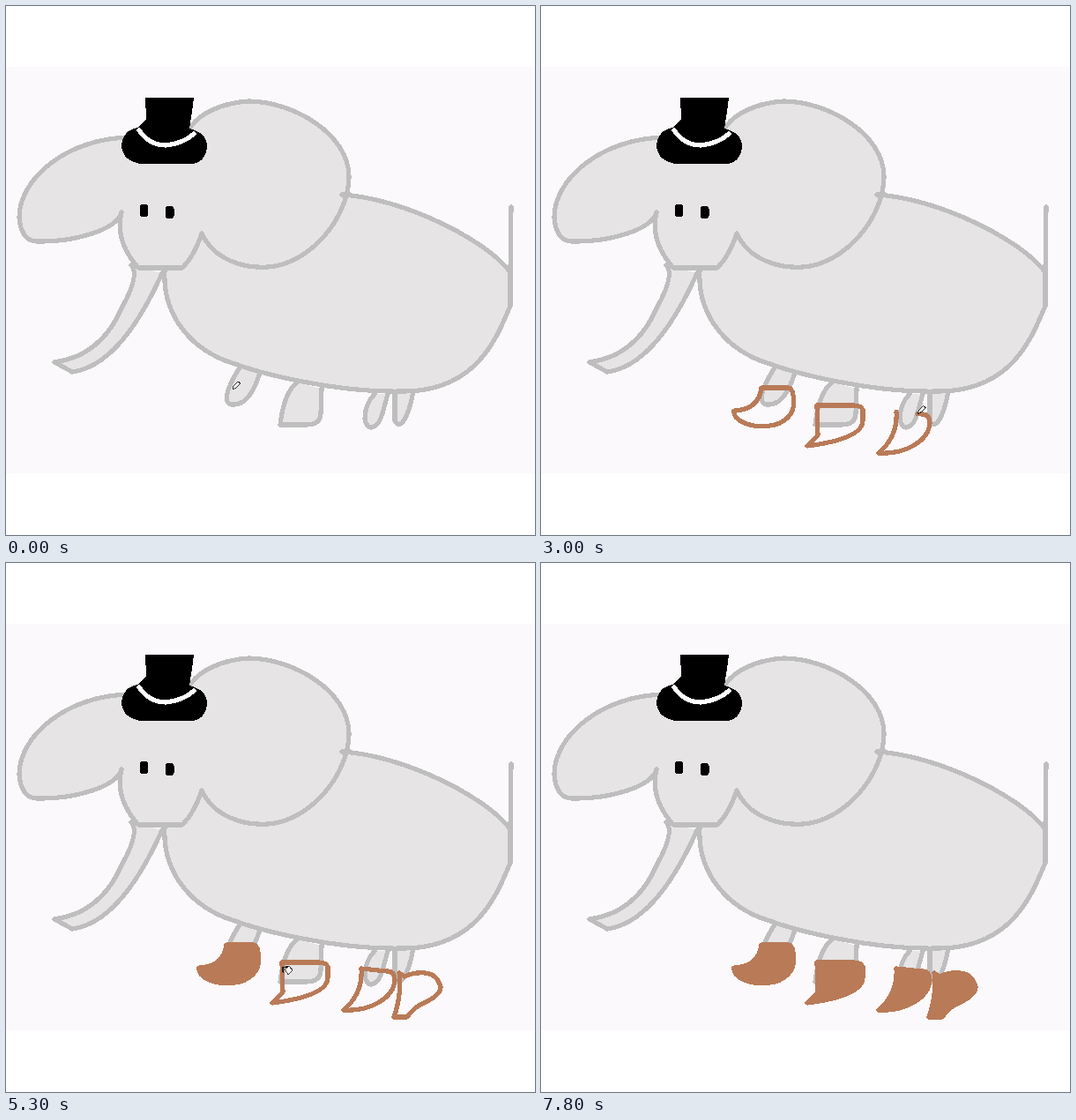
These frames come from a looping animation (600 px wide and 600 px high, 8.1 s). An HTML page:

```html
<!DOCTYPE html>
<html>
<head>
<meta charset="utf-8">
<style>
html, body { margin: 0; height: 100%; overflow: hidden; background: #fff; }
svg { display: block; width: 100vw; height: 100vh; }
path { stroke-linecap: round; stroke-linejoin: round; }
</style>
</head>
<body>
<svg id="stage" viewBox="0 0 600 600" shape-rendering="crispEdges"></svg>
<script>
const LOOP = 8100, STEP = 100, INK = 5.2;
const SKIN = '#e6e4e5', LINE = '#bfbebf', BROWN = '#b97a57';
const stage = document.getElementById('stage');

function add(tag, attrs, parent = stage) {
  const node = document.createElementNS('http://www.w3.org/2000/svg', tag);
  for (const key in attrs) node.setAttribute(key, attrs[key]);
  return parent.appendChild(node);
}

const draw = (d, fill, stroke = 'none', width = INK, parent = stage) =>
  add('path', { d, fill, stroke, 'stroke-width': width }, parent);

const body = 'M381,214C450,218 545,265 572,302V340C557,375 535,437 450,437' +
  'C375,439 290,417 260,406C215,393 177,355 180,300';
const trunk = 'M142,294Q152,305 132,341Q108,397 55,404L75,415Q130,408 177,303';
const leftEar = 'M140,149C70,150 15,195 15,240Q17,266 35,267C75,268 125,255 131,234';
const face = 'Q123,266 150,297H200Q214,283 222,258';
const rightEar = 'C236,288 270,298 297,296C345,293 388,240 389,195C390,145 325,108 275,108' +
  'C245,110 215,122 205,145Z';

// Each shoe is outlined from start to end, then filled by one click on the leg and one on the rest.
const shoes = [
  { leg: 'M267,407C248,436 246,452 257,452C276,453 284,428 288,416',
    outline: 'M250,433Q247,458 219,459C216,482 300,490 285,437Q283,433 280,433Z',
    start: 200, end: 1000, legClick: 4700, restClick: 4900 },
  { leg: 'M330,427Q315,439 311,475H340Q357,475 357,462L358,434',
    outline: 'M313,453L314,487L302,499Q365,491 365,470V458Q363,453 355,453Z',
    start: 1300, end: 2000, legClick: 5500, restClick: 5900 },
  { leg: 'M418,440Q407,452 407,468C409,484 422,480 427,462L433,440',
    outline: 'M403,460Q405,488 383,507C415,509 440,492 441,473Q441,463 432,463Z',
    start: 2400, end: 3100, legClick: 6500, restClick: 6700 },
  { leg: 'M441,440V470C446,482 456,470 462,437',
    outline: 'M446,465Q449,490 440,515H455Q461,506 470,501Q493,491 493,481Q489,466 475,465Q462,464 452,469Z',
    start: 3300, end: 3900, legClick: 7400, restClick: 7000 },
];

add('rect', { y: 69, width: 600, height: 461, fill: '#fbf9fb' });

shoes.forEach((shoe, i) => {
  const id = 'shoe' + i;
  add('path', { d: shoe.outline }, add('clipPath', { id }));
  shoe.rest = draw(shoe.outline, BROWN);
  draw(shoe.leg, SKIN, LINE);
  shoe.legPart = draw(shoe.leg, BROWN, BROWN, INK + 1);
  shoe.legPart.setAttribute('clip-path', `url(#${id})`);
});

draw(body + 'L222,250Z', SKIN);
draw(body, 'none', LINE);
draw(trunk, SKIN, LINE);
draw(leftEar + face + rightEar, SKIN, LINE);
draw('M381,214H390M573,228L572,302', 'none', LINE);

// Hat and eyes
draw('M158,104H213L211,120L208,139Q228,144 228,159Q227,176 212,179H153Q132,176 131,158Q133,140 150,138L159,128Z', '#000');
draw('M151,141Q163,158 181,158Q201,156 213,145', 'none', '#fff');
for (const [x, y] of [[156, 232], [185.5, 234]])
  add('rect', { x: x - 4.5, y: y - 7, width: 9.5, height: 14, rx: 3 });

for (const shoe of shoes) {
  shoe.line = draw(shoe.outline, 'none', BROWN);
  shoe.length = shoe.line.getTotalLength();
}

const pencil = draw('M0,0L1,-4L6,-9L9,-7L4,-2Z', '#eee', '#333', 1);
const bucket = add('g', {});
draw('M-3,-1L2,-5L6,0L1,5Z', '#f4f4f4', '#444', 1, bucket);
draw('M-5,2V-3L0,-4', 'none', '#222', 1.5, bucket);

// Cursor stops are [time, x, y].
function lineStop(shoe, time, done) {
  const p = shoe.line.getPointAtLength(done * shoe.length);
  return [time, p.x, p.y];
}
function clickStop(shoe, time, fx, fy) {
  const box = shoe.line.getBBox();
  return [time, box.x + fx * box.width, box.y + fy * box.height];
}
const pencilStops = [[0, 257, 435],
  ...shoes.flatMap(s => [lineStop(s, s.start, 0), lineStop(s, s.end, 1)]),
  [4200, 415, 335]];
const bucketStops = [[4500, 300, 405],
  ...shoes.flatMap(s => [clickStop(s, s.legClick, 0.7, 0.2), clickStop(s, s.restClick, 0.68, 0.65)])
    .sort((a, b) => a[0] - b[0]),
  [7700, 460, 485]];

function along(stops, t) {
  const i = stops.findIndex(s => s[0] >= t);
  if (i < 1) return stops[0].slice(1);
  const a = stops[i - 1], b = stops[i], k = (t - a[0]) / (b[0] - a[0]);
  return [a[1] + (b[1] - a[1]) * k, a[2] + (b[2] - a[2]) * k];
}

const show = (node, on) => node.setAttribute('visibility', on ? 'visible' : 'hidden');
function place(node, stops, t, position = along(stops, t)) {
  show(node, t >= stops[0][0] && t <= stops[stops.length - 1][0]);
  node.setAttribute('transform', `translate(${position})`);
}

function render(now) {
  const t = Math.floor(now % LOOP / STEP) * STEP;
  let tip;
  for (const s of shoes) {
    const done = Math.min(1, Math.max(0, (t - s.start) / (s.end - s.start)));
    show(s.line, done > 0);
    s.line.setAttribute('stroke-dasharray', done < 1 ? `${done * s.length} ${s.length * 2}` : 'none');
    show(s.rest, t >= s.restClick + STEP);
    show(s.legPart, t >= s.legClick + STEP);
    if (t >= s.start && t <= s.end) tip = lineStop(s, t, done).slice(1);
  }
  place(pencil, pencilStops, t, tip);
  place(bucket, bucketStops, t);
}

const origin = performance.now();
function tick() {
  render(performance.now() - origin);
  requestAnimationFrame(tick);
}
tick();
</script>
</body>
</html>
```
